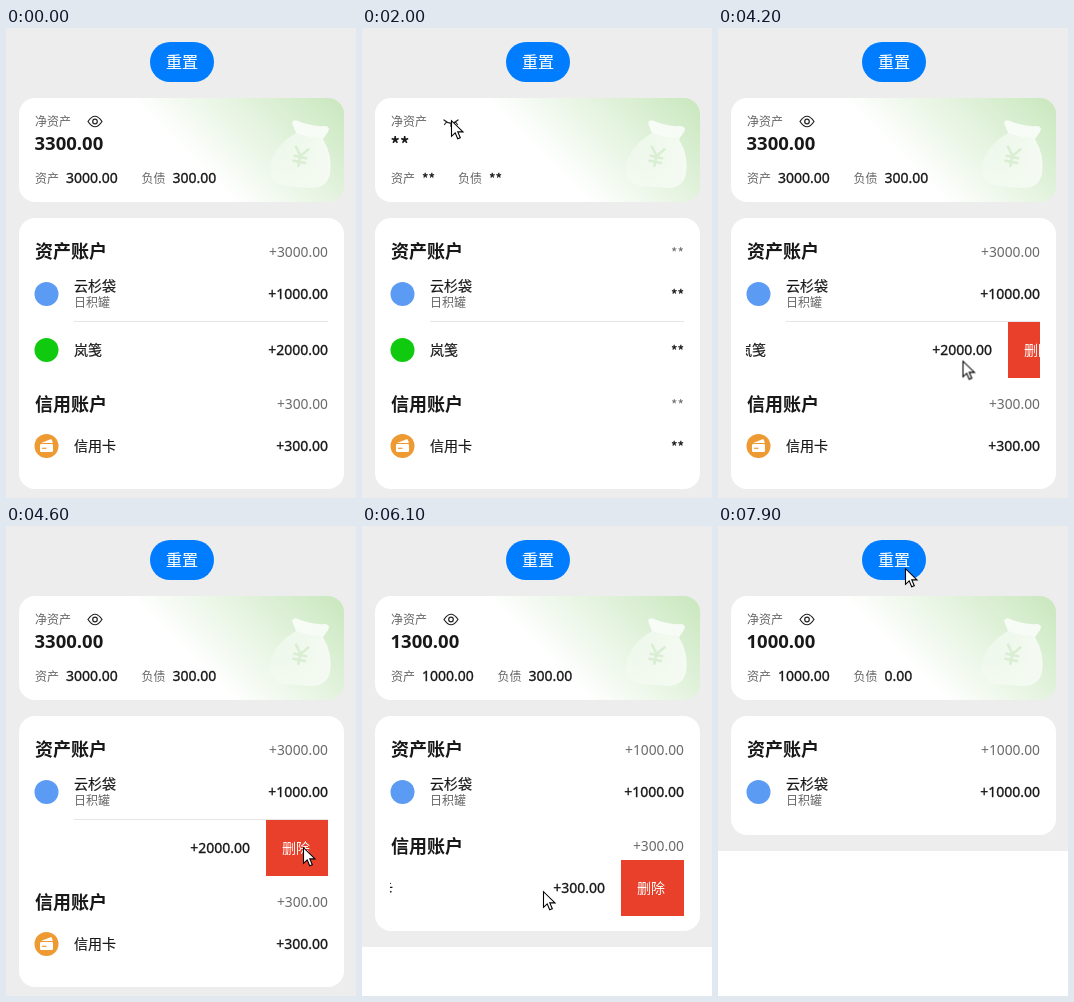
Animation, 350 px wide and 470 px high, one loop 8000 ms. Source, as an HTML page:

```html
<!DOCTYPE html>
<html lang="zh-CN">
<head>
<meta charset="utf-8">
<title>资产账户</title>
<style>
html, body { margin: 0; width: 100%; height: 100%; overflow: hidden; background: #fff; }
svg { display: block; width: 350px; height: 470px; }
text { font: 14px 'Noto Sans CJK SC', 'Noto Sans', sans-serif; fill: #181818; }
.small { font-size: 12px; fill: #666; }
.title { font-size: 18px; font-weight: 700; }
.medium { stroke: #181818; stroke-width: .2px; }
.white { fill: #fff; }
.button { font-size: 16px; stroke: #fff; stroke-width: .15px; }
.num { font-family: 'Noto Sans', sans-serif; }
.num.medium { stroke-width: .3px; }
.net { font-size: 18.5px; font-weight: 700; }
.sum { font-size: 13.8px; fill: #6a6a6a; }
.end { text-anchor: end; }
.mid { text-anchor: middle; }
.mask { font-family: 'Noto Sans CJK SC', sans-serif; transform: translateY(.6px); }
.line { fill: none; stroke: #222; stroke-width: 1.2; stroke-linecap: round; }

#cursor, .slide { animation: 8s linear infinite paused; }
#cursor { animation-name: point; }
#bankSlide { animation-name: swipeBank; }
#chatSlide { animation-name: swipeChat; }

@keyframes point {
  0%, 6.25% { transform: translate(225px, 415px); animation-timing-function: cubic-bezier(.35, .2, .5, 1); }
  16.25% { transform: translate(94px, 99px); }
  17.5% { transform: translate(90px, 94px); }
  18.75%, 38.75% { transform: translate(89px, 92px); }
  40% { transform: translate(108px, 114px); }
  41.25% { transform: translate(195px, 213px); }
  42.5% { transform: translate(273px, 298px); }
  45% { transform: translate(302px, 334px); }
  46.25% { transform: translate(304px, 341px); }
  50% { transform: translate(296px, 336px); }
  51.25% { transform: translate(284px, 335px); }
  53.75% { transform: translate(205px, 330px); }
  55% { transform: translate(197px, 328px); }
  56.25% { transform: translate(252px, 324px); }
  57.5% { transform: translate(297px, 321px); }
  61.25% { transform: translate(298px, 322px); }
  62.5%, 66.25% { transform: translate(298px, 321px); }
  71.25% { transform: translate(285px, 360px); }
  72.5% { transform: translate(270px, 362px); }
  75% { transform: translate(195px, 364px); }
  76.25% { transform: translate(181px, 365px); }
  77.5% { transform: translate(188px, 365px); }
  81.25% { transform: translate(285px, 358px); }
  82.5% { transform: translate(296px, 358px); }
  85%, 88.75% { transform: translate(290px, 360px); animation-timing-function: cubic-bezier(.35, .1, .4, 1); }
  98.75%, 100% { transform: translate(187px, 42px); }
}
@keyframes swipeChat {
  0%, 50% { transform: translateX(0); }
  51.25% { transform: translateX(-11px); }
  52.5% { transform: translateX(-48px); }
  53.75% { transform: translateX(-78px); }
  55% { transform: translateX(-83px); }
  56.25% { transform: translateX(-80px); }
  57.5% { transform: translateX(-78px); }
  61.25%, 100% { transform: translateX(-76px); }
}
@keyframes swipeBank {
  0%, 71.25% { transform: translateX(0); }
  72.5% { transform: translateX(-15px); }
  73.75% { transform: translateX(-52px); }
  75% { transform: translateX(-78px); }
  76.25% { transform: translateX(-79px); }
  85%, 100% { transform: translateX(-76px); }
}
</style>
</head>
<body>
<svg viewBox="0 0 350 470">
  <defs>
    <linearGradient id="mint" gradientUnits="userSpaceOnUse" x1="68" y1="229" x2="283" y2="15">
      <stop offset=".5" stop-color="#fff"/>
      <stop offset="1" stop-color="#c8e7bd"/>
    </linearGradient>
    <linearGradient id="bag" x1="1" y1=".3" x2="0" y2=".6">
      <stop stop-color="#fff" stop-opacity=".75"/>
      <stop offset="1" stop-color="#fff" stop-opacity=".25"/>
    </linearGradient>
    <clipPath id="chatClip"><rect x="28" y="294" width="294" height="56"/></clipPath>
    <clipPath id="bankClip"><rect x="28" y="390" width="294" height="56"/></clipPath>
    <g id="delete">
      <rect x="338" width="100" height="56" fill="#e8402a"/>
      <text class="white mid" x="368" y="33.2">删除</text>
    </g>
  </defs>

  <rect id="page" width="350" height="477" fill="#ededed"/>
  <rect x="144" y="14" width="64" height="40" rx="20" fill="#007dff"/>
  <text class="white mid button" x="176" y="40">重置</text>

  <rect x="13" y="70" width="325" height="104" rx="16" fill="url(#mint)"/>
  <path d="M286 95Q287 91 292 93Q306 99 319 98Q325 99 322 104L317 111Q303 110 290 105Z" fill="#fff" fill-opacity=".8"/>
  <path d="M290 105Q303 110 317 111Q327 128 324 146Q321 160 305 160L279 158Q264 155 264 140Q266 119 290 105Z" fill="url(#bag)"/>
  <path d="M-7 -9L0 0L7 -9M0 0V11M-7 1H7M-7 6H7" transform="translate(294.5 128) rotate(12)"
    fill="none" stroke="#d9eed2" stroke-width="2.6"/>

  <text class="small" x="29" y="97.5">净资产</text>
  <g id="eyeOpen" class="line">
    <path d="M82 93.5Q89 83 96 93.5Q89 104 82 93.5Z"/>
    <circle cx="89" cy="93.5" r="2.3"/>
  </g>
  <path id="eyeShut" class="line" d="M82 92Q89 98.5 96 92M84.5 94L82.5 96.5M89 95.5V98.5M93.5 94L95.5 96.5"/>
  <text id="net" class="num net" x="28.5" y="122.3"></text>
  <text class="small" x="29" y="154.5">资产</text>
  <text id="assets" class="num medium" x="60" y="155"></text>
  <g id="debt">
    <text class="small" x="135.5" y="154.5">负债</text>
    <text id="debts" class="num medium" x="166.5" y="155"></text>
  </g>

  <rect id="list" x="13" y="190" width="325" height="271" rx="16" fill="#fff"/>
  <text class="title" x="29" y="230">资产账户</text>
  <text id="assetSum" class="num sum end" x="322" y="229"></text>
  <circle cx="40.5" cy="266" r="12" fill="#5b9bf3"/>
  <text class="medium" x="68" y="262.8">云杉袋</text>
  <text class="small" x="68" y="279">日积罐</text>
  <text id="purse" class="num medium end" x="322" y="271"></text>

  <g id="chatRow">
    <rect x="68" y="293" width="254" height="1" fill="#e5e5e5"/>
    <g clip-path="url(#chatClip)">
      <g id="chatSlide" class="slide">
        <circle cx="40.5" cy="322" r="12" fill="#0fca0f"/>
        <text class="medium" x="68" y="327.3">岚笺</text>
        <text id="chat" class="num medium end" x="322" y="327"></text>
        <use href="#delete" y="294"/>
      </g>
    </g>
  </g>

  <g id="credit">
    <text class="title" x="29" y="382.5">信用账户</text>
    <text id="creditSum" class="num sum end" x="322" y="381"></text>
    <g clip-path="url(#bankClip)">
      <g id="bankSlide" class="slide">
        <circle cx="40.5" cy="418" r="12" fill="#ee9a32"/>
        <path d="M35 415L44.5 411.2Q45.5 411 46 412L46.8 415Z" fill="#fff"/>
        <rect x="34" y="416" width="13" height="8" rx="1.2" fill="#fff"/>
        <path d="M36 420.3H40.5" stroke="#ee9a32" stroke-width="1.2"/>
        <text class="medium" x="68" y="423.3">信用卡</text>
        <text id="bank" class="num medium end" x="322" y="423"></text>
        <use href="#delete" y="390"/>
      </g>
    </g>
  </g>

  <path id="cursor" d="M.5 .7V16.3L4.2 12.9L6.7 18.8L9.3 17.7L6.8 11.9H12Z" fill="#fff" stroke="#000" stroke-width="1.1"/>
</svg>
<script>
const LOOP = 8000, TICK = 100;
const $ = id => document.getElementById(id);
const motions = document.getAnimations();

function amount(id, value, hidden, sign = '') {
  const el = $(id);
  el.textContent = hidden ? '**' : sign + value.toFixed(2);
  el.classList.toggle('mask', hidden);
}

function show(id, on) {
  $(id).style.visibility = on ? '' : 'hidden';
}

function render(t) {
  const hidden = t >= 1900 && t < 2800;
  const hasChat = t < 5200, hasBank = t < 7200;
  const purse = 1000, chat = hasChat ? 2000 : 0, debt = hasBank ? 300 : 0;
  const assets = purse + chat;

  amount('net', assets + debt, hidden);
  amount('assets', assets, hidden);
  amount('debts', debt, hidden);
  amount('assetSum', assets, hidden, '+');
  amount('creditSum', debt, hidden, '+');
  amount('purse', purse, hidden, '+');
  amount('chat', chat, hidden, '+');
  amount('bank', debt, hidden, '+');

  show('eyeOpen', !hidden);
  show('eyeShut', hidden);
  show('cursor', t >= 500);
  show('chatRow', hasChat);
  show('credit', hasBank);
  $('debt').setAttribute('transform', `translate(${hidden ? -39.5 : 0})`);

  // Removed rows pull the list and the page up.
  const lift = (hasChat ? 0 : 56) + (hasBank ? 0 : 96);
  $('page').setAttribute('height', 477 - lift);
  $('list').setAttribute('height', 271 - lift);
  $('credit').setAttribute('transform', `translate(0 ${hasChat ? 0 : -56})`);

  for (const m of motions) m.currentTime = t;
}

function frame() {
  const t = performance.now() % LOOP;
  render(Math.floor(t / TICK) * TICK);
  requestAnimationFrame(frame);
}
frame();
</script>
</body>
</html>
```
